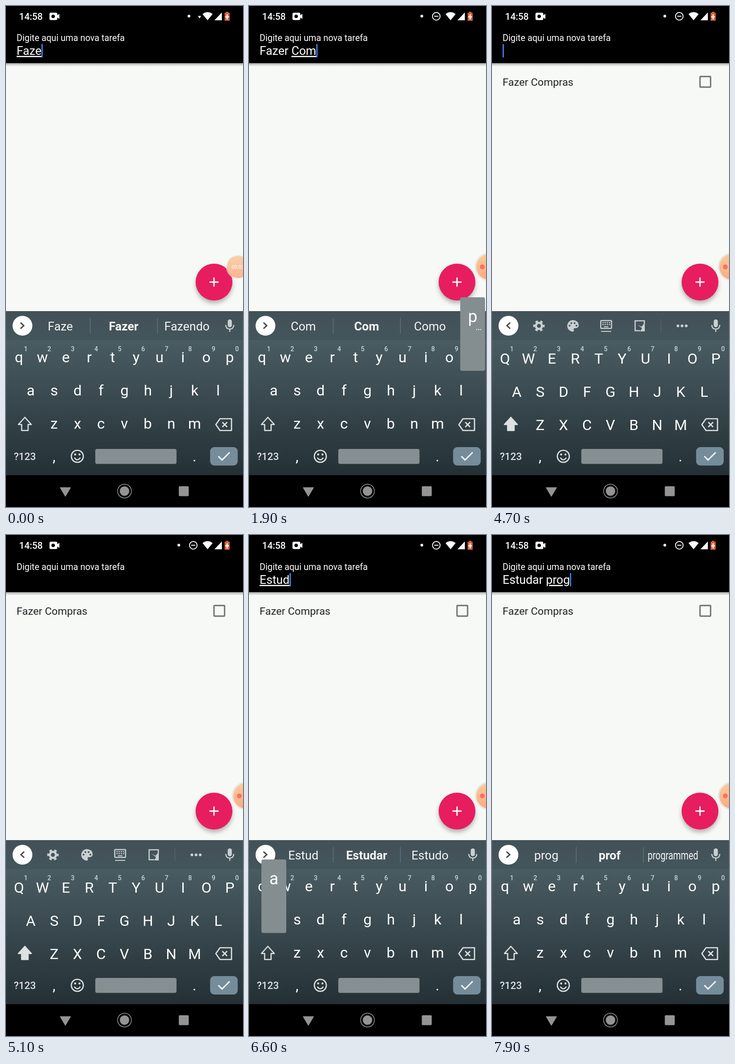
Animation, 515 px wide and 1087 px high, one loop 8000 ms. Source, as an HTML page:

```html
<!DOCTYPE html>
<html lang="pt-BR">
<head>
<meta charset="utf-8">
<title>Lista de tarefas</title>
<style>
  html, body { margin: 0; width: 100%; height: 100%; overflow: hidden; background: #000; }
  svg { display: block; width: 515px; height: 1087px; font-family: Roboto, sans-serif; }
  text { white-space: pre; }
  .mid { text-anchor: middle; }
  .key { font-size: 32px; fill: #fff; text-anchor: middle; }
  .hint { font-size: 14px; font-weight: 500; fill: #cdd3d5; text-anchor: middle; }
  .sug { font-size: 26px; fill: #f4f6f6; text-anchor: middle; }
  .line { fill: none; stroke-linecap: butt; }
  .soft { fill: #c9cfd2; }
  #fab { filter: drop-shadow(0 6px 5px rgba(0, 0, 0, .28)); }
  #word { text-decoration: underline; text-decoration-thickness: 1.5px; }
</style>
</head>
<body>
<svg viewBox="0 0 515 1087">
  <defs>
    <linearGradient id="keysBg" x2="0" y2="1">
      <stop offset="0" stop-color="#495c62"/><stop offset=".5" stop-color="#37464c"/><stop offset="1" stop-color="#243036"/>
    </linearGradient>
    <linearGradient id="barBg" x2="0" y2="1">
      <stop offset="0" stop-color="#435157"/><stop offset="1" stop-color="#43555c"/>
    </linearGradient>
    <linearGradient id="headShade" x2="0" y2="1">
      <stop offset="0" stop-opacity=".32"/><stop offset="1" stop-opacity="0"/>
    </linearGradient>
    <linearGradient id="peach" x2="0" y2="1">
      <stop offset="0" stop-color="#fbcb9c"/><stop offset="1" stop-color="#fbab7e"/>
    </linearGradient>
    <clipPath id="fabClip"><circle cx="452" cy="599" r="40"/></clipPath>
  </defs>

  <rect width="515" height="1087"/>
  <rect y="124" width="515" height="538" fill="#f7f9f7"/>
  <rect y="124" width="515" height="7" fill="url(#headShade)"/>

  <!-- status bar -->
  <g fill="#fff">
    <text x="28.5" y="30" font-size="20.2" font-weight="500">14:58</text>
    <rect x="94.5" y="14.5" width="17" height="16" rx="3"/>
    <path d="M110 21 L116 17 V28 L110 24Z"/>
    <circle cx="102.5" cy="22.5" r="3.8" fill="#000"/>
    <circle id="dot" cy="22" r="3"/>
    <g id="dnd">
      <circle class="line" cx="407" cy="22.3" r="8.3" stroke="#fff" stroke-width="1.8"/>
      <rect x="402.5" y="21.3" width="9" height="2"/>
    </g>
    <path id="tick" d="M417 21.5 H424 L420.5 27Z"/>
    <path d="M427 17.5 Q438 9 449 17.5 L438 31Z"/>
    <path d="M453 31 L469 14 V31Z"/>
    <path d="M478 12.5 H483 V14.5 H486 V32 H475 V14.5 H478Z" fill="#d4603c"/>
    <path d="M480.5 18 V29 M476.5 23.5 H484.5" stroke="#fff" stroke-width="2.4"/>
  </g>

  <!-- field -->
  <text x="23" y="75.5" font-size="19.3" fill="#fff">Digite aqui uma nova tarefa</text>
  <text id="input" x="23" y="106.3" font-size="25.75" fill="#fff" xml:space="preserve"><tspan id="done"></tspan><tspan id="word"></tspan></text>
  <rect id="caret" y="82.5" width="2.8" height="29" fill="#4081e6"/>

  <!-- list item -->
  <g id="item">
    <text x="23" y="172.6" font-size="22.9" fill="#212322">Fazer Compras</text>
    <rect class="line" x="452" y="153" width="23" height="23" rx="1" stroke="#6e7070" stroke-width="2.9"/>
  </g>

  <!-- add button -->
  <circle id="fab" cx="452" cy="599" r="40" fill="#e71d5f"/>
  <circle id="ripple" cx="452" cy="599" fill="#fff" clip-path="url(#fabClip)"/>
  <path d="M452 589 V609 M442 599 H462" stroke="#fff" stroke-width="2.8"/>

  <!-- recorder bubble -->
  <g id="bubble">
    <circle id="ring" cy="566" fill="#e9e8e6"/>
    <circle id="disc" cy="566" fill="url(#peach)"/>
    <text id="timer" class="mid" x="504" y="570" font-size="11" fill="#fff"></text>
    <circle id="rec" cx="507" cy="566" r="5.2" fill="#fb6f6b"/>
  </g>

  <!-- keyboard -->
  <rect y="662" width="515" height="63" fill="url(#barBg)"/>
  <rect y="725" width="515" height="293" fill="url(#keysBg)"/>
  <circle cx="35.8" cy="693.7" r="21.5" fill="#fff"/>
  <path id="chevron" class="line" stroke="#45484a" stroke-width="3"/>
  <g class="soft">
    <rect x="481.8" y="680" width="9" height="17" rx="4.5"/>
    <path class="line" d="M477.5 692 Q478 701 486.3 701 Q494.600 701 495 692 M486.300 701 V707" stroke="#c9cfd2" stroke-width="2.5"/>
  </g>
  <g id="words">
    <path d="M183 677 V711 M329 677 V711" stroke="#64737a" stroke-width="1.5"/>
    <text class="sug" y="704"></text><text class="sug" y="704"></text><text class="sug" y="704"></text>
  </g>
  <g id="tools" class="soft">
    <g class="line" stroke="#c9cfd2">
      <circle cx="102" cy="694" r="6.7" stroke-width="4.800"/>
      <circle cx="102" cy="694" r="10.4" stroke-width="4" stroke-dasharray="5.400 5.490" stroke-dashoffset="2.700"/>
    </g>
    <path d="M176 681.500 A12.500 12.500 0 1 0 176 706.500 Q179 705.500 177.700 702.800 Q176.500 699.500 179.500 699 H182 Q188.500 698 188.500 692.500 Q187 682 176 681.500Z"/>
    <g fill="#43535a">
      <circle cx="168.500" cy="693.500" r="2"/><circle cx="172.500" cy="688" r="2"/>
      <circle cx="179.500" cy="688" r="2"/><circle cx="183.500" cy="693.500" r="2"/>
    </g>
    <rect class="line" x="236.300" y="682.500" width="23.500" height="17" rx="1.500" stroke="#c9cfd2" stroke-width="2.500"/>
    <path class="line" d="M240 687 H257 M240 691.300 H257" stroke="#c9cfd2" stroke-width="2.600" stroke-dasharray="2.600 2.100"/>
    <path class="line" d="M243 696 H253 M237 706 H259" stroke="#c9cfd2" stroke-width="2.200"/>
    <path class="line" d="M322 704.500 H311 V683 H331 V690" stroke="#c9cfd2" stroke-width="2.600"/>
    <path d="M316 691 L325 696 L332 687 V706 H322 L326 699Z"/>
    <path d="M367 679 V709" stroke="#55646b" stroke-width="1.500"/>
    <circle cx="404" cy="694" r="3"/><circle cx="413" cy="694" r="3"/><circle cx="422" cy="694" r="3"/>
  </g>
  <g id="hints"></g>
  <g id="lower"></g>
  <g id="upper"></g>
  <path id="shift" d="M41 892.500 L55 908 H48 V921 H34 V908 H27Z" stroke="#dde1e2" stroke-width="2.600" stroke-linejoin="round"/>
  <g class="line" stroke="#dde1e2" stroke-width="2.700" stroke-linejoin="round">
    <path d="M456 908.300 L465 895.500 H490 V921 H465Z"/>
    <path d="M470 903 L480.500 913.500 M480.500 903 L470 913.500"/>
    <circle cx="155" cy="977" r="13"/>
    <path d="M148.500 980 Q155 989 161.500 980"/>
  </g>
  <circle cx="150.300" cy="973" r="2.200" fill="#dde1e2"/><circle cx="159.700" cy="973" r="2.200" fill="#dde1e2"/>
  <text class="mid" x="41" y="985" font-size="22" font-weight="500" fill="#dde1e2">?123</text>
  <text class="key" x="104.500" y="988">,</text>
  <text class="key" x="409.500" y="988">.</text>
  <rect id="space" x="194" y="961" width="176.500" height="32.500" rx="4"/>
  <rect x="443.500" y="957" width="60" height="40" rx="9" fill="#758c9b"/>
  <path class="line" d="M461.500 977 L469.500 985 L486 968.500" stroke="#fff" stroke-width="2.900"/>
  <g id="popup">
    <rect y="632" width="54" height="159.500" rx="4" fill="#848e90"/>
    <text id="popKey" class="key" x="27" y="686" style="font-size:36px"></text>
    <text id="more" x="33" y="703" font-size="20" fill="#fff">…</text>
  </g>

  <!-- navigation -->
  <g fill="#949494">
    <path d="M118 1045 H140 L129 1063.500Z" stroke="#949494" stroke-linejoin="round" stroke-width="1.500"/>
    <circle cx="257.500" cy="1052.500" r="10.300"/>
    <circle class="line" cx="257.500" cy="1052.500" r="15" stroke="#949494" stroke-width="1.500"/>
    <rect x="375.500" y="1042" width="21.500" height="21.500" rx="2"/>
  </g>
</svg>

<script>
const LOOP = 8000;
const $ = id => document.getElementById(id);
const set = (id, attrs) => { for (const k in attrs) $(id).setAttribute(k, attrs[k]); };
const show = (id, on) => { $(id).style.display = on ? '' : 'none'; };
const within = (t, a, b) => t >= a && t < b;
const ramp = (t, a, b) => Math.min(1, Math.max(0, (t - a) / (b - a)));

const rows = ['qwertyuiop', 'asdfghjkl', 'zxcvbnm'];
const rowX = [28.2, 53.8, 104.5];
const keyX = (row, i) => rowX[row] + 50.9 * i;

// time, key, field text, suggestions (* marks bold, none shows the toolbar)
const steps = [
  [0, '', 'Faze', 'Faze|*Fazer|Fazendo'],
  [250, 'r', 'Fazer', 'Fazer|*Fazer|Fazeres'],
  [900, ' ', 'Fazer ', 'Uns|O|Oq'],
  [1450, 'C', 'Fazer C', 'C|*Com|Como'],
  [1650, 'o', 'Fazer Co', 'Co|*Com|Como'],
  [1750, 'm', 'Fazer Com', 'Com|*Com|Como'],
  [1950, 'p', 'Fazer Comp', 'Comp|*Compras|Comprar'],
  [2400, '', 'Fazer Compras ', 'de|e|no'],
  [3600, '', '', 'de|e|no'],
  [4500, '', '', ''],
  [5250, 'E', 'E', 'E|*E|Eu'],
  [5550, 's', 'Es', 'Es|*Es|ES'],
  [5850, 't', 'Est', 'Est|*Esta|Está'],
  [6050, 'u', 'Estu', 'Estu|*Estudar|Estudo'],
  [6450, 'd', 'Estud', 'Estud|*Estudar|Estudo'],
  [6650, 'a', 'Estuda', 'Estuda|*Estudar|Estudando'],
  [6800, 'r', 'Estudar', 'Estudar|*Estudar|Estudara'],
  [7050, ' ', 'Estudar ', 'e|pra|em'],
  [7300, 'p', 'Estudar p', 'p|*pra|para'],
  [7450, 'r', 'Estudar pr', 'pr|*pra|pro'],
  [7600, 'o', 'Estudar pro', 'pro|*pro|prof'],
  [7850, 'g', 'Estudar prog', 'prog|*prof|programmed']
];

function buildKeys() {
  const layer = (convert, drop) => rows.map((row, r) => [...row].map((c, i) =>
    `<text class="key" x="${keyX(r, i)}" y="${773 + 72 * r + drop}">${convert(c)}</text>`).join('')).join('');
  $('lower').innerHTML = layer(c => c, 0);
  $('upper').innerHTML = layer(c => c.toUpperCase(), 2.5);
  $('hints').innerHTML = [...'1234567890'].map((d, i) =>
    `<text class="hint" x="${43 + 51 * i}" y="749">${d}</text>`).join('');
}

const sugs = [...document.querySelectorAll('.sug')];

function drawStep([, , text, list]) {
  const cut = text.lastIndexOf(' ') + 1;
  $('done').textContent = text.slice(0, cut);
  $('word').textContent = text.slice(cut);
  set('caret', { x: 23 + (text ? $('input').getComputedTextLength() : 0) });
  show('words', list);
  show('tools', !list);
  set('chevron', { d: list ? 'M31.500 687 L38.500 693.500 L31.500 700' : 'M39.500 687 L32.500 693.500 L39.500 700' });
  if (!list) return;
  list.split('|').forEach((s, i) => {
    const el = sugs[i];
    el.textContent = s.replace('*', '');
    el.style.fontWeight = s[0] === '*' ? 700 : 400;
    // long words are condensed to the column
    const k = Math.min(1, 110 / el.getComputedTextLength());
    el.setAttribute('transform', `translate(${118 + 137.600 * i}) scale(${k} 1)`);
  });
}

function drawPopup(t) {
  const hit = steps.find(([at, key]) => key && within(t, at - 50, at + 50));
  const key = hit ? hit[1] : '';
  set('space', { fill: key === ' ' ? '#a6adaf' : '#868f91' });
  show('popup', key.trim());
  if (!key.trim()) return;
  const row = rows.findIndex(r => r.includes(key.toLowerCase()));
  const x = keyX(row, rows[row].indexOf(key.toLowerCase()));
  set('popup', { transform: `translate(${Math.min(459, x - 26.800)} ${72 * row})` });
  $('popKey').textContent = key;
  show('more', row === 0);
}

function drawBubble(t) {
  const k = ramp(t, 1500, 1900), e = k * k * (3 - 2 * k);
  const cx = 504 + 17.500 * e;
  set('ring', { cx, r: 26 + 5 * e, opacity: .6 + .4 * e });
  set('disc', { cx, r: 24 + 3.500 * e, opacity: .85 + .15 * e });
  $('timer').textContent = t < 500 ? '00:03' : '00:04';
  set('timer', { opacity: 1 - e });
  set('rec', { opacity: e });
}

let last;
function frame() {
  const t = performance.now() % LOOP;
  const step = steps.filter(s => s[0] <= t).pop();
  if (step !== last) drawStep(last = step);

  const edit = step[0] === 4500 ? 3600 : step[0];
  show('caret', (t - edit) % 1000 < 500);

  const caps = within(t, 1100, 1500) || within(t, 4400, 5300);
  show('upper', caps);
  show('lower', !caps);
  set('shift', { fill: caps ? '#dde1e2' : 'none' });

  // the status icon is away one second in every three
  const away = (t + 500) % 3000 < 1000;
  show('dnd', !away);
  show('tick', away);
  set('dot', { cx: away ? 397.500 : 375.500 });

  show('item', t >= 3600);
  set('ripple', { r: 40 * ramp(t, 3400, 3700), opacity: .25 * (1 - ramp(t, 3600, 4000)) });
  drawBubble(t);
  drawPopup(t);
  requestAnimationFrame(frame);
}

buildKeys();
frame();
</script>
</body>
</html>
```
